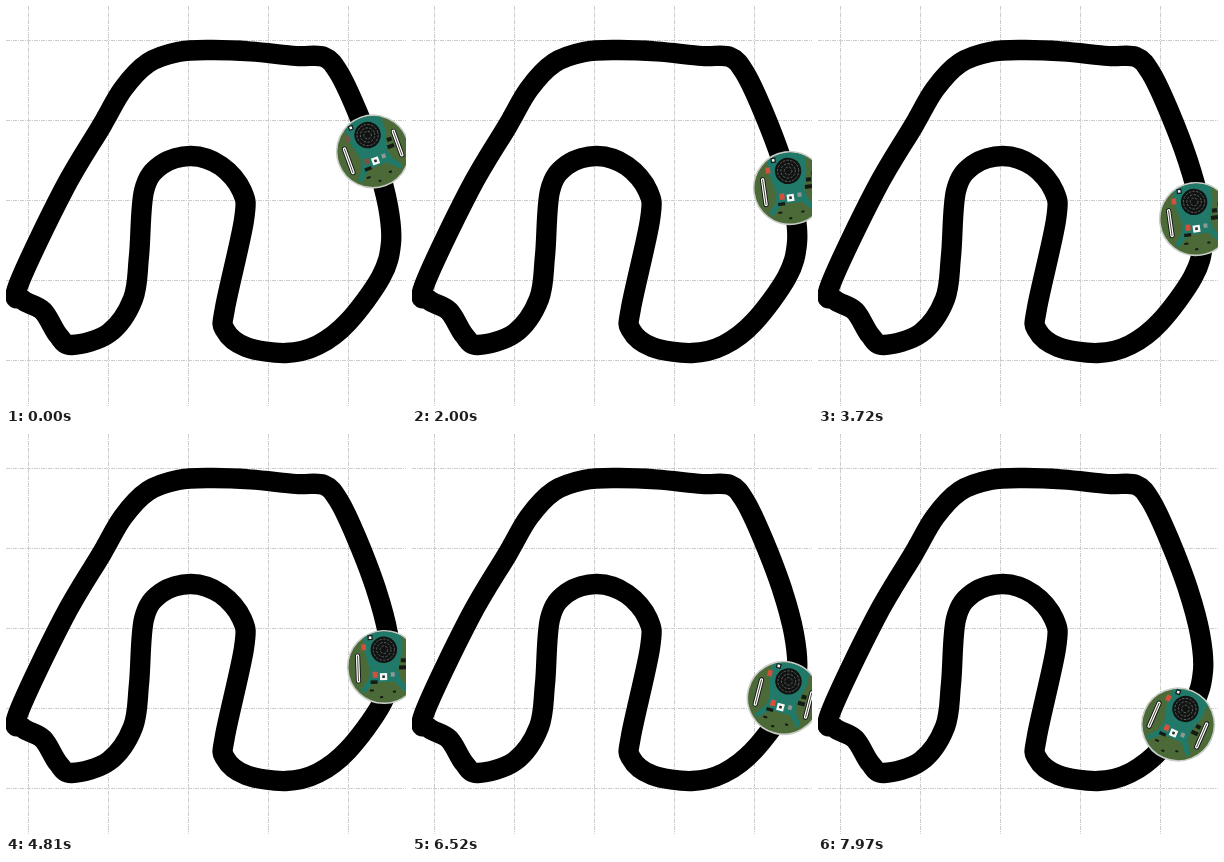
Recreate the animation shown at these times as an HTML page. Size 400 by 400 pixels, loop 8000 ms.

```html
<!DOCTYPE html>
<html lang="en">
<head>
<meta charset="utf-8">
<title>Line follower</title>
<style>
  html, body { margin: 0; width: 100%; height: 100%; overflow: hidden; background: #fff; }
  svg { display: block; width: 100vw; height: 100vh; }
</style>
</head>
<body>
<svg viewBox="0 0 400 400">
  <path id="grid" fill="none" stroke="#cdcdcd" stroke-dasharray="4 1 1 1"/>
  <path id="track" fill="none" stroke="#000" stroke-width="20.3"/>
  <path d="M91 107L101 103L103 126L95 133Z"/>
  <g id="robot">
    <circle r="36.3" fill="#4b6a38" stroke="#c9cdc8" stroke-width="1.6"/>
    <path fill="#217a69" d="M-19 -30A35.5 35.5 0 0 1 19 -30L19 -16L14 3L16 12L23 22L20 26L10 15H-10L-21 26L-24 22L-16 12L-14 3L-19 -16Z"/>
    <g id="slots" fill="none" stroke-linecap="round"></g>
    <g id="lens" transform="translate(.5 -17.3)" fill="none" stroke="#666c69" stroke-width=".8">
      <circle r="13.2" fill="#101312" stroke="none"/>
    </g>
    <path fill="#151a14" d="M15 -1h7v4h-7zM17 -8h5v4h-5zM-14 13h7v3.4h-7zM-15 22h4v2h-4zM-5 29h3v2h-3zM8 24h3v2h-3z"/>
    <path fill="#151a1a" d="M-15.3 -32.3h5v5h-5z"/>
    <path fill="#f6f8f6" d="M-14.1 -31.1h2.6v2.6h-2.6zM-4.4 6h7.2v7.2h-7.2z"/>
    <path fill="#26302e" d="M-2.1 8.3h2.6v2.6h-2.6z"/>
    <path fill="#8d9995" d="M6.5 5.6h4v4.4h-4z"/>
    <path id="leds" d="M-21.8 -23.5h4.6v6h-4.6zM-11.6 4.4h5v6h-5z"/>
  </g>
</svg>
<script>
const LOOP = 8000, STEP = 121, FIRST = 63;
const $ = id => document.getElementById(id);

const lane = [
  [205, 44], [245, 45.5], [290, 50], [318, 51], [333, 67], [351, 105],
  [370, 155], [382, 200], [385, 237], [375, 271], [342, 316], [312, 339],
  [280, 347], [240, 341], [219, 324], [219, 302], [238, 214], [236, 185],
  [215, 160], [185, 150], [155, 159], [138, 185], [133, 250], [127, 293],
  [103, 327], [66, 339], [52, 329], [37, 305], [17, 294], [12, 280],
  [57.5, 184], [95.5, 120], [117, 83], [142, 57], [172, 46]
];

// time, x, heading in degrees
const keys = [
  [0, 367, -20], [910, 373, -9], [2000, 378, -8], [3720, 378, -8],
  [4810, 378, -2], [6520, 371.5, 15], [LOOP, 359.5, 24]
];

const mix = (a, b, u) => a + (b - a) * u;

function closedCurve(pts) {
  const at = i => pts[(i + pts.length) % pts.length];
  let d = `M${at(0)}`;
  pts.forEach((p, i) => {
    const a = at(i - 1), q = at(i + 1), b = at(i + 2);
    const c1 = p.map((v, k) => v + (q[k] - a[k]) / 6);
    const c2 = q.map((v, k) => v - (b[k] - p[k]) / 6);
    d += `C${c1} ${c2} ${q}`;
  });
  return d + 'Z';
}

function draw(t) {
  // the robot moves in regular ticks
  const held = Math.max(0, FIRST + Math.floor((t - FIRST) / STEP) * STEP);
  const i = keys.findIndex(k => k[0] > held);
  const a = keys[i - 1], b = keys[i];
  const u = (held - a[0]) / (b[0] - a[0]);
  const x = mix(a[1], b[1], u), y = 145.5 + 0.0183 * held;
  $('robot').setAttribute('transform',
    `translate(${x} ${y}) rotate(${mix(a[2], b[2], u)})`);
  const glow = Math.min(1, 0.1 + held / 2000);
  $('leds').setAttribute('fill',
    `rgb(${mix(109, 212, glow)},${mix(85, 80, glow)},${mix(69, 58, glow)})`);
}

let grid = '';
for (let p = 22.5; p < 400; p += 80) grid += `M${p} 0V400M0 ${p + 12}H400`;
$('grid').setAttribute('d', grid);
$('track').setAttribute('d', closedCurve(lane));

for (const [color, width] of [['#111', 5.2], ['#fff', 3.4], ['#4a4a40', 1]])
  $('slots').innerHTML +=
    `<path d="M-26 -12V13M26 -12V13" stroke="${color}" stroke-width="${width}"/>`;
for (const r of [10.6, 7.2, 3.8])
  $('lens').innerHTML += `<circle r="${r}" stroke-dasharray="2.4 1.4"/>`;

const start = performance.now();
function tick() {
  draw((performance.now() - start) % LOOP);
  requestAnimationFrame(tick);
}
tick();
</script>
</body>
</html>
```
